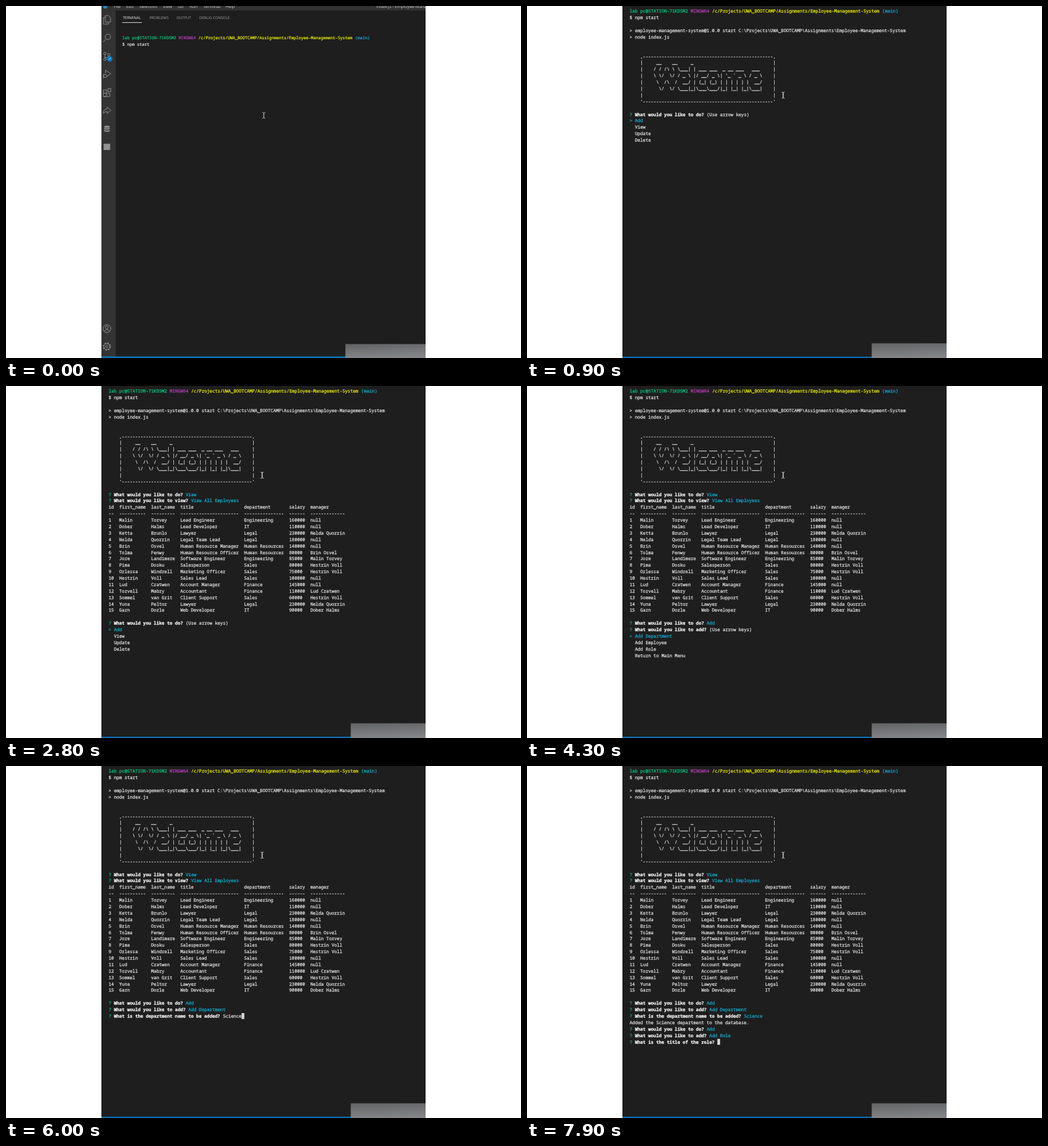
These frames come from a looping animation (788x540 px, 8000 ms). An HTML page:

```html
<!DOCTYPE html>
<html lang="en">
<head>
<meta charset="utf-8">
<title>Employee management terminal</title>
<style>
html, body { margin: 0; width: 100%; height: 100%; overflow: hidden; background: #fff; }
svg { display: block; width: 788px; height: 540px; }
text { white-space: pre; text-rendering: geometricPrecision; }
#term { font: 6.245px "Noto Sans Mono", "DejaVu Sans Mono", monospace; color: #dcdcdc; fill: currentColor; }
#term text { fill: currentColor; stroke: currentColor; stroke-width: 0.24; }
#ui { font: 6.5px "Open Sans", "Noto Sans", sans-serif; fill: #d0d0d0; }
#tabs { font-size: 5.7px; }
#icons { fill: none; stroke: #929292; stroke-width: 0.9; }
#icons .solid { fill: #929292; stroke: none; }
.g { color: #0dbc79; }
.m { color: #b03ab0; }
.y { color: #e5e510; }
.c { color: #11a8cd; }
.b { color: #f4f4f4; font-weight: 700; }
</style>
</head>
<body>
<svg viewBox="0 0 788 540">
  <defs>
    <clipPath id="view"><rect x="146" width="496" height="540"/></clipPath>
    <linearGradient id="grey" x2="0.15" y2="1">
      <stop offset="0" stop-color="#626364"/>
      <stop offset="0.75" stop-color="#84878a"/>
    </linearGradient>
  </defs>
  <g clip-path="url(#view)">
    <rect x="146" width="496" height="540" fill="#1e1e1e"/>
    <g id="scene">
      <rect x="140" y="0" width="28" height="540" fill="#333"/>
      <rect x="140" y="-10" width="510" height="17" fill="#323233"/>
      <g id="ui">
        <circle cx="152" cy="1.2" r="3" fill="#2489ca"/>
        <g id="menu"></g>
        <g id="tabs"></g>
        <path d="M178 25.6H208" stroke="#e7e7e7" stroke-width="0.9"/>
      </g>
      <g id="icons">
        <path d="M152 15h5l3 3v7h-8zM152 18h-3v10h8v-3"/>
        <path d="M152.5 51.5l-3.7 4"/><circle cx="156" cy="47.5" r="4.2"/>
        <circle cx="151.5" cy="73" r="1.8"/><circle cx="151.5" cy="82" r="1.8"/><circle cx="157.5" cy="75" r="1.8"/>
        <path d="M151.5 75v5M157.5 77q0 2-6 2.5"/>
        <circle cx="158.8" cy="81.3" r="4.2" fill="#0a7acc" stroke="none"/>
        <path d="M157.6 82.8l2.4-3" stroke="#fff" stroke-width="0.7"/>
        <path d="M152.5 103V98.5l8 5.5-6 4.2"/><circle cx="151.8" cy="107.5" r="2.5"/><path d="M148.2 105l2 1M148 108h1.3M148.2 111l2-1.5"/>
        <path d="M149 129h5v10h-5zM149 134h10v5h-10M156 127h4.5v4.5h-4.5z"/>
        <path d="M149 165q0-7 6-7v-3l5.5 5-5.5 5v-3q-4 0-6 3z"/>
        <g class="solid">
          <ellipse cx="154.5" cy="185.3" rx="4.3" ry="1.6"/>
          <path d="M150.2 187q4.3 2 8.6 0v2q-4.3 2-8.6 0zM150.2 190.2q4.3 2 8.6 0v2q-4.3 2-8.6 0z"/>
          <rect x="149.5" y="211.5" width="10" height="9.5"/>
        </g>
        <circle cx="154.5" cy="495" r="6"/><circle cx="154.5" cy="493.3" r="2.3"/><path d="M150.3 499q4.2-5 8.4 0"/>
        <circle cx="154.5" cy="522.5" r="4.5"/><circle cx="154.5" cy="522.5" r="1.6"/>
        <circle cx="154.5" cy="522.5" r="5.4" stroke-width="1.6" stroke-dasharray="2.12 2.12"/>
      </g>
      <g id="term"></g>
      <path d="M392.4 163.8q2.1 0 2.1 1v6.6q0 1-2.1 1M396.6 163.8q-2.1 0-2.1 1v6.6q0 1 2.1 1" fill="none" stroke="#cfcfcf" stroke-width="0.9"/>
      <rect x="140" y="537.6" width="510" height="10" fill="#0a74bd"/>
      <rect x="519.3" y="518.6" width="135" height="30" fill="url(#grey)"/>
    </g>
  </g>
</svg>
<script>
const LOOP = 8000, ZOOM_MS = 400;
const LEFT = 178.2, BASE = 51.7, CHAR = 3.747, LINE = 9.102;
const $ = id => document.getElementById(id);

function node(tag, attrs, parent, text) {
  const el = document.createElementNS('http://www.w3.org/2000/svg', tag);
  for (const k in attrs) el.setAttribute(k, attrs[k]);
  if (text) el.textContent = text;
  return parent.appendChild(el);
}

// Window labels
[[165, 'File'], [184, 'Edit'], [204, 'Selection'], [240, 'View'], [263, 'Go'], [281, 'Run'],
 [302, 'Terminal'], [336, 'Help'], [566.5, 'index.js - Employee-Management']]
  .forEach(([x, s]) => node('text', { x, y: 3.5 }, $('menu'), s));
[[179, 'TERMINAL'], [219.5, 'PROBLEMS'], [261, 'OUTPUT'], [295.8, 'DEBUG CONSOLE']]
  .forEach(([x, s], i) => node('text', { x, y: 20.3, fill: i ? '#a2a2a2' : '#f0f0f0' }, $('tabs'), s));

// A row is a list of [class, text]; the class "cursor" draws a block.
const plain = s => [['', s]];
const ask = (q, ...rest) => [['g', '? '], ['b', q + ' '], ...rest];
const answer = (q, a) => ask(q, ['c', a]);
const typing = (q, s) => [ask(q, ['', s], ['cursor', ' '])];
const list = (q, items, sel = 0, hint = !sel) => [
  ask(q, ['', hint ? '(Use arrow keys)' : '']),
  ...items.map((s, i) => i === sel ? [['c', '> ' + s]] : plain('  ' + s))
];

const DO = 'What would you like to do?';
const SEE = 'What would you like to view?';
const ADD = 'What would you like to add?';
const DEPT = 'What is the department name to be added?';
const ROLE = 'What is the title of the role?';
const mainItems = ['Add', 'View', 'Update', 'Delete'];
const viewItems = ['View All Employees', 'View All Departments', 'View All Roles', 'Return to Main Menu'];
const addItems = ['Add Department', 'Add Employee', 'Add Role', 'Return to Main Menu'];

const shell = [
  [['g', 'lab pc@STATION-71KD5M2 '], ['m', 'MINGW64 '],
   ['y', '/c/Projects/UWA_BOOTCAMP/Assignments/Employee-Management-System '], ['c', '(main)']],
  plain('$ npm start')
];
const boot = [...shell, [],
  plain('> employee-management-system@1.0.0 start C:\\Projects\\UWA_BOOTCAMP\\Assignments\\Employee-Management-System'),
  plain('> node index.js'), [], []
];
const art = String.raw`
 __    __     _
/ / /\ \ \___| | ___ ___  _ __ ___   ___
\ \/  \/ / _ \ |/ __/ _ \| '_ ${'`'} _ \ / _ \
 \  /\  /  __/ | (_| (_) | | | | | |  __/
  \/  \/ \___|_|\___\___/|_| |_| |_|\___|
`.split('\n').slice(1);
const rule = '-'.repeat(49);
const intro = [...boot,
  plain(`    ,${rule},`),
  ...art.map(s => plain(`    |    ${s.padEnd(45)}|`)),
  plain(`    '${rule}'`), []
];

// first, last, title, department, salary, manager's id
const staff = `Malin,Torvey,Lead Engineer,Engineering,160000,
Dober,Halms,Lead Developer,IT,110000,
Ketta,Brunlo,Lawyer,Legal,230000,4
Nelda,Quorrin,Legal Team Lead,Legal,180000,
Brin,Osvel,Human Resource Manager,Human Resources,140000,
Tolma,Fenwy,Human Resource Officer,Human Resources,80000,5
Jore,Landimere,Software Engineer,Engineering,85000,1
Pima,Dosku,Salesperson,Sales,80000,10
Orlessa,Windrell,Marketing Officer,Sales,75000,10
Hestrin,Voll,Sales Lead,Sales,100000,
Lud,Cratwen,Account Manager,Finance,145000,
Torvell,Mabry,Accountant,Finance,110000,11
Sommel,van Grit,Client Support,Sales,60000,10
Yuna,Peltor,Lawyer,Legal,230000,4
Garn,Dorle,Web Developer,IT,90000,2`.split('\n').map(s => s.split(','));
const widths = [2, 10, 9, 22, 15, 6, 13];
const tableRow = cells => plain(cells.map((s, i) => String(s).padEnd(widths[i])).join('  '));
const boss = id => id ? staff[id - 1].slice(0, 2).join(' ') : 'null';
const table = [
  tableRow(['id', 'first_name', 'last_name', 'title', 'department', 'salary', 'manager']),
  tableRow(widths.map(w => '-'.repeat(w))),
  ...staff.map((p, i) => tableRow([i + 1, ...p.slice(0, 5), boss(p[5])])), []
];

const picked = [...intro, answer(DO, 'View')];
const listed = [...picked, answer(SEE, 'View All Employees'), ...table];
const adding = [...listed, answer(DO, 'Add')];
const naming = [...adding, answer(ADD, 'Add Department')];
const added = [...naming, answer(DEPT, 'Science'), plain('Added the Science department to the database.')];
const again = [...added, answer(DO, 'Add')];

const steps = [
  [0, shell],
  [300, boot],
  [700, [...intro, ...list(DO, mainItems)]],
  [1400, [...intro, ...list(DO, mainItems, 1)]],
  [1800, [...picked, ...list(SEE, viewItems)]],
  [2500, [...listed, ...list(DO, mainItems)]],
  [4000, [...adding, ...list(ADD, addItems)]],
  [4400, [...naming, ...typing(DEPT, '')]],
  ...[...'Science'].map((_, i) => [4900 + i * 150, [...naming, ...typing(DEPT, 'Science'.slice(0, i + 1))]]),
  [6100, [...added, ...list(DO, mainItems)]],
  [6600, [...again, ...list(ADD, addItems)]],
  [7300, [...again, ...list(ADD, addItems, 1)]],
  [7500, [...again, ...list(ADD, addItems, 2)]],
  [7700, [...again, answer(ADD, 'Add Role'), ...typing(ROLE, '')]]
];

function draw(rows) {
  const term = $('term');
  term.replaceChildren();
  rows.forEach((row, r) => {
    let col = 0;
    for (const [cls, s] of row) {
      const x = LEFT + col * CHAR, y = BASE + r * LINE;
      if (cls === 'cursor') node('rect', { x, y: y - 6.4, width: CHAR, height: 8.4 }, term);
      else node('text', { x, y, class: cls }, term, s);
      col += s.length;
    }
  });
}

let shown;
function tick() {
  const t = performance.now() % LOOP;
  const rows = steps.findLast(([at]) => at <= t)[1];
  if (rows !== shown) draw(shown = rows);
  const p = 1 - (1 - Math.min(t / ZOOM_MS, 1)) ** 2;
  $('scene').setAttribute('transform', `translate(${-36.5 * p} ${-45.75 * p}) scale(${1 + 0.086 * p})`);
  requestAnimationFrame(tick);
}
tick();
</script>
</body>
</html>
```
